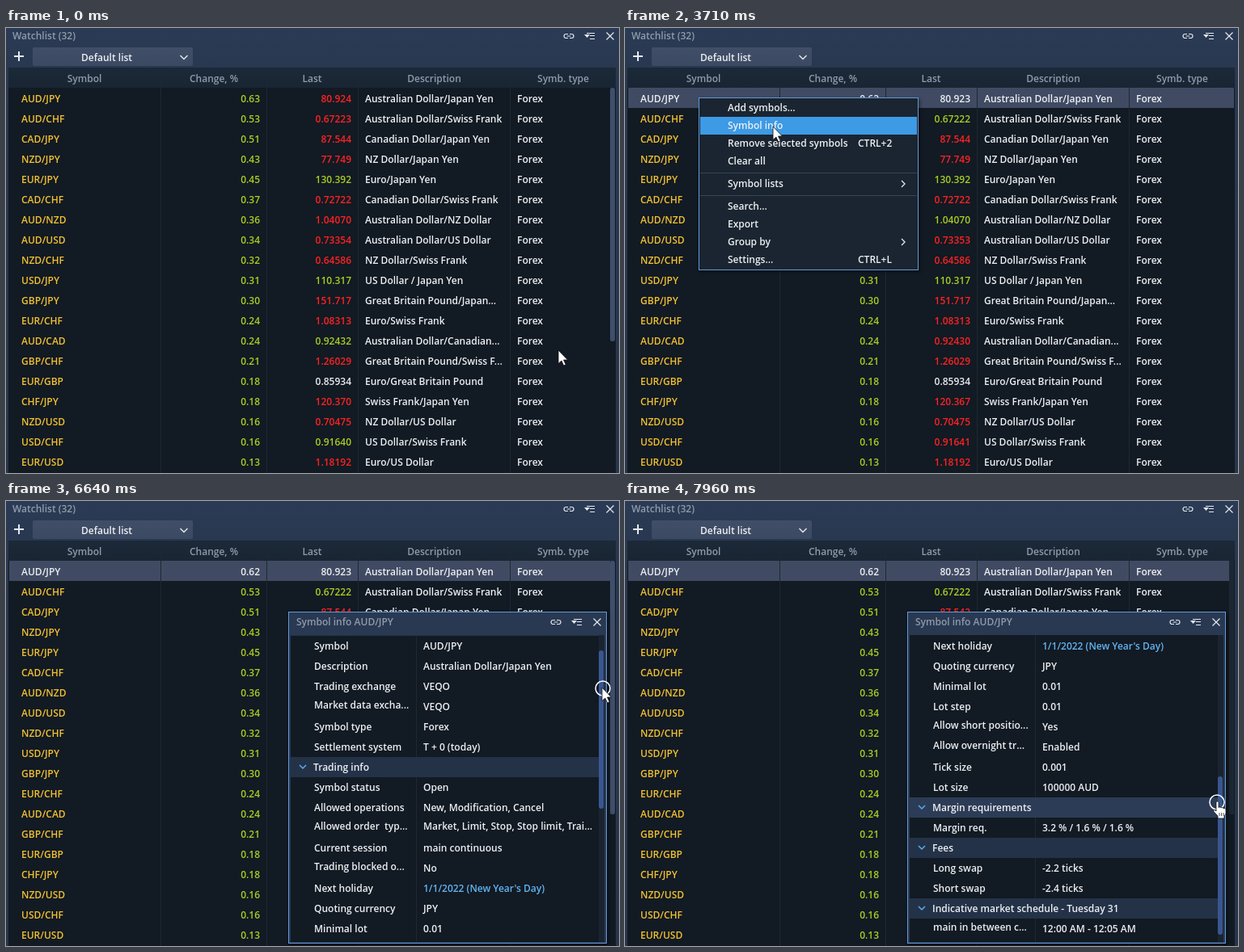
An HTML page that plays this animation: 758 by 551 pixels, repeating every 7990 ms.

```html
<!DOCTYPE html>
<html lang="en">
<head>
<meta charset="utf-8">
<title>Watchlist</title>
<style>
  html, body { margin: 0; width: 100%; height: 100%; overflow: hidden; background: #2a3952; }
  div, svg { position: absolute; }
  #stage {
    left: 0; top: 0; width: 758px; height: 551px; overflow: hidden;
    background: linear-gradient(#2b3b55, #293850 50px, #27354b);
    font: 600 12px/25px "Open Sans", "Noto Sans", sans-serif; color: #eceff2;
  }
  .text { white-space: pre; height: 25px; }
  svg { width: 1px; height: 1px; overflow: visible; fill: none; stroke: #e4e9ef; }
  .bar { border-radius: 3px; background: #3f4e6b; }
  .panel { box-sizing: border-box; border: 1px solid #6399d8; box-shadow: 2px 2px 4px #0007; }
</style>
</head>
<body>
<div id="stage"></div>
<script>
const LOOP = 7990;
const SELECT_AT = 2150, MENU_AT = 2500, INFO_AT = 4390, MENU_END = 4300;
const DRAG_AT = 6490, HAND_AT = 7860;
const COLORS = { r: '#ff2222', g: '#abce22', w: '#eceff2', y: '#f2c131', dim: '#8f9baa', link: '#62b4f2' };
const stage = document.getElementById('stage');

function box(parent, x, y, w, h, background = '', className = '') {
  const el = document.createElement('div');
  el.className = className;
  Object.assign(el.style, { left: x + 'px', top: y + 'px', width: w + 'px', height: h + 'px', background });
  parent.append(el);
  return el;
}

// y is the middle of the line; x is the left, right or middle, by align
function text(parent, x, y, str, color = COLORS.w, align = 'left') {
  const left = { left: x, right: x - 240, center: x - 120 }[align];
  const el = box(parent, left, y - 13, 240, 25, '', 'text');
  el.style.color = color;
  el.style.textAlign = align;
  el.textContent = str;
  return el;
}

function icon(parent, x, y, shapes) {
  const el = document.createElementNS('http://www.w3.org/2000/svg', 'svg');
  el.style.left = x + 'px';
  el.style.top = y + 'px';
  el.innerHTML = shapes;
  parent.append(el);
  return el;
}

function windowIcons(parent, x, y) {
  icon(parent, x, y, '<path d="M-1-2.5H-3.5a2.5 2.5 0 0 0 0 5H-1M1-2.5H3.5a2.5 2.5 0 0 1 0 5H1M-2.5 0H2.5" stroke-width="1.2"/>');
  icon(parent, x + 26, y, '<path d="M-4-3.5H6M0-.5H6M0 3.5H6"/><path d="M-7-2H0L-3.5 2Z" fill="#e4e9ef" stroke="none"/>');
  icon(parent, x + 51, y, '<path d="M-4.5-4.5 4.5 4.5M4.5-4.5-4.5 4.5" stroke-width="1.2"/>');
}

const show = (el, on) => { el.style.visibility = on ? 'visible' : 'hidden'; };

// Toolbar
text(stage, 8, 10, 'Watchlist (32)', COLORS.dim);
windowIcons(stage, 695.5, 9.5);
icon(stage, 16, 35, '<path d="M-6 0H6M0-6V6" stroke-width="2"/>');
box(stage, 33, 24, 198, 23, 'linear-gradient(#414e68, #3c4962)').style.borderRadius = '2px';
text(stage, 124.5, 37, 'Default list', COLORS.w, 'center');
icon(stage, 220, 36, '<path d="M-4.5-2 0 2.5 4.5-2" stroke-width="1.4"/>');

// Quotes table
const quotes = [
  'AUD/JPY|0.63|80.924|r|Australian Dollar/Japan Yen',
  'AUD/CHF|0.53|0.67223|r|Australian Dollar/Swiss Frank',
  'CAD/JPY|0.51|87.544|r|Canadian Dollar/Japan Yen',
  'NZD/JPY|0.43|77.749|r|NZ Dollar/Japan Yen',
  'EUR/JPY|0.45|130.392|g|Euro/Japan Yen',
  'CAD/CHF|0.37|0.72722|r|Canadian Dollar/Swiss Frank',
  'AUD/NZD|0.36|1.04070|r|Australian Dollar/NZ Dollar',
  'AUD/USD|0.34|0.73354|r|Australian Dollar/US Dollar',
  'NZD/CHF|0.32|0.64586|r|NZ Dollar/Swiss Frank',
  'USD/JPY|0.31|110.317|g|US Dollar / Japan Yen',
  'GBP/JPY|0.30|151.717|r|Great Britain Pound/Japan...',
  'EUR/CHF|0.24|1.08313|r|Euro/Swiss Frank',
  'AUD/CAD|0.24|0.92432|g|Australian Dollar/Canadian...',
  'GBP/CHF|0.21|1.26029|r|Great Britain Pound/Swiss F...',
  'EUR/GBP|0.18|0.85934|w|Euro/Great Britain Pound',
  'CHF/JPY|0.18|120.370|r|Swiss Frank/Japan Yen',
  'NZD/USD|0.16|0.70475|r|NZ Dollar/US Dollar',
  'USD/CHF|0.16|0.91640|g|US Dollar/Swiss Frank',
  'EUR/USD|0.13|1.18192|r|Euro/US Dollar'
].map(line => line.split('|'));

// time, row, change, last, colour of last
const updates = [
  [240, 8, '0.33', '0.64587', 'g'],
  [360, 17, '0.16', '0.91641', 'r'],
  [600, 15, '0.18', '120.367', 'r'],
  [2030, 6, '0.36', '1.04070', 'g'],
  [2300, 12, '0.24', '0.92430', 'r'],
  [2860, 0, '0.62', '80.923', 'r'],
  [3260, 1, '0.53', '0.67222', 'g'],
  [3380, 7, '0.34', '0.73353', 'r'],
  [3380, 8, '0.32', '0.64586', 'r'],
  [7150, 2, '0.51', '87.542', 'r']
];

box(stage, 3, 49, 751, 502, '#121a23');
box(stage, 3, 49, 751, 25, 'linear-gradient(#1c2938, #192533)');
const selection = box(stage, 4, 74, 749, 25, '#404b63');
[191, 322, 435, 623].forEach(x => box(stage, x, 50, 1, 501, '#1e2833'));
['Symbol', 'Change, %', 'Last', 'Description', 'Symb. type'].forEach((name, i) =>
  text(stage, [97, 257, 378.5, 529.5, 689][i], 63, name, COLORS.dim, 'center'));

const cells = quotes.map(([symbol, change, last, color, description], i) => {
  const y = 88 + 25 * i;
  text(stage, 444, y, description);
  text(stage, 632, y, 'Forex');
  return {
    symbol: text(stage, 19, y, symbol, COLORS.y),
    change: text(stage, 314, y, change, COLORS.g, 'right'),
    last: text(stage, 427, y, last, COLORS[color], 'right')
  };
});
const tableTrack = box(stage, 747, 74, 6, 314, '#1c2733');
const tableThumb = box(stage, 747, 74, 6, 314, '', 'bar');

// Context menu
const menu = box(stage, 91, 86, 272, 214, '#1a2531', 'panel');
const menuHover = box(menu, 1, 23, 268, 22, '#3d9ae5');
const chevron = '<path d="M-2-4 2 0-2 4" stroke-width="1.3"/>';
[['Add symbols...', 99], ['Symbol info', 121], ['Remove selected symbols', 143, 'CTRL+2'], ['Clear all', 165],
 ['Symbol lists', 193, '>'], ['Search...', 221], ['Export', 243], ['Group by', 265, '>'], ['Settings...', 287, 'CTRL+L']
].forEach(([name, y, extra]) => {
  text(menu, 35, y - 87, name);
  if (extra === '>') icon(menu, 252, y - 87, chevron);
  else if (extra) text(menu, 196, y - 87, extra);
});
[179, 207].forEach(y => box(menu, 1, y - 87, 268, 1, '#374454'));

// Symbol info window; lines without a value are section heads
const details = [
  'General info', 'Symbol|AUD/JPY', 'Description|Australian Dollar/Japan Yen', 'Trading exchange|VEQO',
  'Market data excha...|VEQO', 'Symbol type|Forex', 'Settlement system|T + 0 (today)',
  'Trading info', 'Symbol status|Open', 'Allowed operations|New, Modification, Cancel',
  'Allowed order  typ...|Market, Limit, Stop, Stop limit, Trai...', 'Current session|main continuous',
  'Trading blocked o...|No', "Next holiday|1/1/2022 (New Year's Day)", 'Quoting currency|JPY',
  'Minimal lot|0.01', 'Lot step|0.01', 'Allow short positio...|Yes', 'Allow overnight tr...|Enabled',
  'Tick size|0.001', 'Lot size|100000 AUD', 'Margin requirements', 'Margin req.|3.2 % / 1.6 % / 1.6 %',
  'Fees', 'Long swap|-2.2 ticks', 'Short swap|-2.4 ticks',
  'Indicative market schedule - Tuesday 31', 'main in between c...|12:00 AM - 12:05 AM'
];
const info = box(stage, 349, 137, 394, 411, '#2a3952', 'panel');
text(info, 9, 12, 'Symbol info AUD/JPY', COLORS.dim);
windowIcons(info, 329.5, 11.5);
const view = box(info, 2, 28, 388, 380, '#121a23');
view.style.overflow = 'hidden';
box(view, 155, 0, 1, 380, '#1e2833');
const content = box(view, 0, 0, 381, 700);
const heads = new Map();
details.forEach((line, i) => {
  const [name, value] = line.split('|');
  const y = 14 + 25 * i;
  const lift = str => str.endsWith('...') ? 2 : 0;
  if (value) {
    text(content, 29, y - lift(name), name);
    text(content, 164, y - lift(value), value, name === 'Next holiday' ? COLORS.link : COLORS.w);
  } else {
    heads.set(i, box(content, 0, y - 13, 381, 25));
    icon(content, 14.5, y - 1, '<path d="M-4-2 0 2 4-2" stroke="#55aef0" stroke-width="1.5"/>');
    text(content, 28, y, name);
  }
});
box(view, 381, 0, 7, 380, '#1a2430');
const infoThumb = box(view, 381, 2, 6, 196, '', 'bar');

// Pointer
const ring = icon(stage, 0, 0, '<circle r="9" stroke="#fff" stroke-width="1.5"/>');
const arrow = icon(stage, 0, 0, '<path d="M0 0V16.5L3.9 13 6.6 19 9.2 17.8 6.5 12H11.5Z" fill="#fff" stroke="#111" stroke-width=".8"/>');
const hand = icon(stage, 0, 0, '<path d="M0 1.5C0-.5 3-.5 3 1.5V7.5C4 6.5 6 7 6 8 7 7 9 7.5 9 8.8 10 8 12 8.5 12 10V15L10 18V21H2V18L-3 12.5C-4 11-2 9.5 0 12Z" fill="#fff" stroke="#111" stroke-width=".8"/><path d="M4 14V18M6.5 14V18M9 14V18" stroke="#111" stroke-width=".7"/>');

// Tracks: time, then values
const pointerTrack = [
  [510, 683, 399], [780, 413, 269], [1050, 413, 269], [1390, 111, 123], [1780, 68, 83], [1900, 68, 83],
  [2150, 91, 86], [3170, 91, 86], [3710, 183, 122], [5100, 183, 122], [5600, 639, 238], [5790, 639, 238],
  [6000, 737, 190], [6150, 737, 214], [DRAG_AT, 737, 214], [6970, 737, 268], [7630, 731, 360], [7960, 731, 372]
];
const dragTrack = [[DRAG_AT, 0], [6970, 54], [7630, 146.5], [7900, 173]];
const tableBarTrack = [[1050, 1], [1390, 0], [4300, 0], [4480, 1], [7050, 1], [7270, 0]];
const infoBarTrack = [[5250, 0], [5500, 1]];
const THUMB_RATIO = 0.5325;
const smooth = p => p * p * (3 - 2 * p);

function sample(track, t, ease = p => p) {
  const next = track.findIndex(key => key[0] > t);
  if (next < 1) return track.at(next).slice(1);
  const a = track[next - 1], b = track[next];
  const p = ease((t - a[0]) / (b[0] - a[0]));
  return a.slice(1).map((v, i) => v + (b[i + 1] - v) * p);
}

function setCell(cell, str, color) {
  if (cell.textContent !== str) cell.textContent = str;
  cell.style.color = color;
}

function renderQuotes(t) {
  const rows = quotes.map(([, change, last, color]) => [change, last, color]);
  for (const [time, row, ...values] of updates) if (t >= time) rows[row] = values;
  rows.forEach(([change, last, color], i) => {
    const selected = i === 0 && t >= SELECT_AT;
    cells[i].symbol.style.color = selected ? COLORS.w : COLORS.y;
    setCell(cells[i].change, change, selected ? COLORS.w : COLORS.g);
    setCell(cells[i].last, last, selected ? COLORS.w : COLORS[color]);
  });
  show(selection, t >= SELECT_AT);
  const [bar] = sample(tableBarTrack, t);
  tableThumb.style.opacity = bar;
  show(tableTrack, t < 1780 || t >= MENU_END);
}

function renderMenu(t, x, y) {
  const open = t >= MENU_AT && t < MENU_END;
  show(menu, open);
  show(menuHover, open && x > 92 && y >= 88);
  menuHover.style.top = 1 + 22 * Math.floor((y - 88) / 22) + 'px';
}

function renderInfo(t, y) {
  const [drag] = sample(dragTrack, t);
  const offset = 25 * Math.round(drag / THUMB_RATIO / 25);
  const dragging = t >= DRAG_AT;
  const hovered = dragging ? Math.floor((y - 170 + offset) / 25) : -1;
  show(info, t >= INFO_AT);
  content.style.top = -offset + 'px';
  heads.forEach((el, i) => { el.style.background = i === hovered ? '#2d3c56' : '#243248'; });
  infoThumb.style.top = 2 + Math.round(drag) + 'px';
  infoThumb.style.background = dragging ? '#39568f' : '#3f4e6b';
  infoThumb.style.opacity = sample(infoBarTrack, t)[0];
}

function render(t) {
  const [x, y] = sample(pointerTrack, t, t < DRAG_AT ? smooth : undefined).map(Math.round);
  renderQuotes(t);
  renderMenu(t, x, y);
  renderInfo(t, y);
  const grab = t >= HAND_AT;
  for (const el of [arrow, hand, ring]) el.style.transform = `translate(${x}px, ${y}px)`;
  ring.style.transform = `translate(${x + 1}px, ${y + 1}px)`;
  show(arrow, !grab);
  show(hand, grab);
  show(ring, t >= DRAG_AT);
}

const start = performance.now();
function tick() {
  render((performance.now() - start) % LOOP);
  requestAnimationFrame(tick);
}
tick();
</script>
</body>
</html>
```
